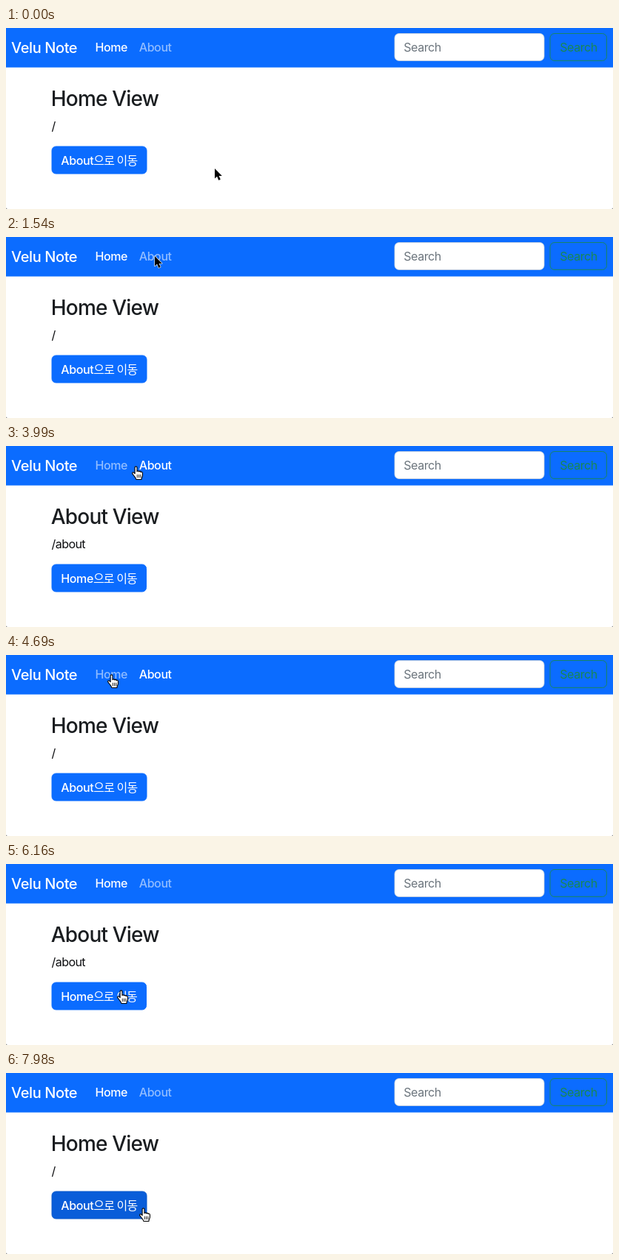
Write an HTML page that moves like this. It is 820 px wide and 246 px high and loops after 8 s.

```html
<!DOCTYPE html>
<html lang="ko">
<head>
<meta charset="utf-8">
<title>Router demo</title>
<style>
  html, body { margin: 0; width: 100%; height: 100%; overflow: hidden; background: #666; }
  svg { display: block; width: 820px; height: 246px; }
  text {
    font: 400 16px Inter, "Noto Sans CJK KR", "Noto Sans CJK", sans-serif;
    font-optical-sizing: none;
    letter-spacing: -.4px;
    fill: #212529;
  }
  .brand { font-size: 20px; font-weight: 450; letter-spacing: -.4px; fill: #fff; }
  .nav, .label { font-weight: 450; fill: #fff; }
  .title { font-size: 28px; font-weight: 530; letter-spacing: -.82px; fill: #1a1d20; }
  .path { letter-spacing: -.55px; fill: #0c0d0f; }
  .ko { font-weight: 500; letter-spacing: -.8px; }
</style>
</head>
<body>
<svg viewBox="0 0 820 246">
  <path d="M0 0H820V243.5a2.5 2.5 0 0 1-2.5 2.5H2.5a2.5 2.5 0 0 1-2.5-2.5Z" fill="#fff"/>
  <rect width="820" height="53.6" fill="#0b6cff"/>
  <text class="brand" x="7" y="33.5">Velu Note</text>
  <text class="nav" id="navHome" x="120.4" y="32">Home</text>
  <text class="nav" id="navAbout" x="179.7" y="32">About</text>
  <rect x="525" y="7.5" width="202" height="37" rx="6" fill="#fff" stroke="#ced4da" stroke-width=".8"/>
  <text x="537.2" y="32" style="fill:#6c757d">Search</text>
  <rect x="735" y="7.5" width="76.5" height="37" rx="6" fill="none" stroke="#198754" stroke-width=".9"/>
  <text x="748.2" y="32" style="fill:#198754">Search</text>

  <text class="title" id="title" x="60.8" y="105.5"></text>
  <text class="path" id="path" x="61.5" y="138.5"></text>
  <rect id="button" x="62" y="161" height="37" rx="5.5"/>
  <text class="label" x="74.3" y="185.5"><tspan id="target"></tspan><tspan class="ko">으로 이동</tspan></text>

  <path id="arrow" d="M0 0V13.6L3.1 10.8L5.3 15.9L7.8 14.8L5.6 9.9H9.8Z"
    fill="#000" stroke="#fff" stroke-width="1.2" stroke-linejoin="round" paint-order="stroke"/>
  <g id="hand" stroke="#000" stroke-linecap="round" stroke-linejoin="round">
    <path fill="#fff" d="M4 1.8C4 .4 6.6 .4 6.6 1.8V7C6.9 6 8.8 6 9 7.2C9.4 6.4 11.1 6.5 11.2 7.8
      C11.6 7.2 13.4 7.3 13.4 8.8V11.5C13.4 13.5 12 14.3 12 16.8H5.6C5.4 14.8 3.6 13.4 2.2 11.4
      C1.2 10 .2 9.2 .9 8.4C1.7 7.5 3.2 8.6 4 9.6Z"/>
    <path fill="none" stroke-width=".8" d="M6.9 11V14.3M9 11V14.3M11 11V14.3"/>
  </g>
</svg>
<script>
const LOOP = 8000, TICK = 70;
const START = [282, 191];

// Pointer moves: first tick, last tick, x, y
const moves = [
  [70, 140, 258, 169], [630, 910, 196, 120], [1120, 1120, 184, 58],
  [1400, 1400, 186, 50], [1540, 1540, 201, 26],
  [2380, 2730, 146, 28], [3290, 3500, 200, 28],
  [3850, 3990, 176, 29], [4060, 4270, 143, 28],
  [5110, 5390, 159, 133], [5460, 5880, 156, 173],
  [6650, 7070, 166, 182], [7980, 7980, 186, 185]
];
const clicks = [2380, 3290, 3850, 4690, 6160, 7560];
const HAND_FROM = 1750, BUTTON_ENTER = 5740, FADE = 150;

const pages = [
  { title: "Home View", path: "/", target: "About", width: 128 },
  { title: "About View", path: "/about", target: "Home", width: 127.5 }
];

const $ = id => document.getElementById(id);
const mix = (a, b, p) => a + (b - a) * p;
const ease = p => {
  p = Math.min(1, Math.max(0, p));
  return p * p * (3 - 2 * p);
};
const blend = (a, b, p) => `rgb(${a.map((v, i) => Math.round(mix(v, b[i], p)))})`;

function pointer(t) {
  let [x, y] = START;
  for (const [from, to, nx, ny] of moves) {
    if (t < from) break;
    const steps = (to - from) / TICK + 1;
    const p = Math.min(1, ((t - from) / TICK + 1) / steps);
    x = mix(x, nx, p);
    y = mix(y, ny, p);
  }
  return [x, y];
}

function draw(time) {
  const t = Math.floor(time / TICK) * TICK;
  const past = clicks.filter(c => c <= t);
  const last = past.length ? past[past.length - 1] : -LOOP;
  const index = past.length % 2;
  const page = pages[index];

  $("title").textContent = page.title;
  $("path").textContent = page.path;
  $("target").textContent = page.target;

  const fade = ease((t - last) / FADE);
  const about = index ? fade : 1 - fade;
  $("navAbout").style.fillOpacity = mix(.55, 1, about);
  $("navHome").style.fillOpacity = mix(1, .55, about);

  const hover = ease((t - Math.max(last, BUTTON_ENTER)) / FADE);
  const button = $("button");
  button.setAttribute("width", page.width);
  button.setAttribute("fill", blend([11, 108, 255], [9, 93, 217], hover));
  button.setAttribute("stroke", blend([11, 108, 255], [10, 88, 202], hover));

  const [x, y] = pointer(t);
  const overLink = t >= HAND_FROM && (y < 48 || y > 160);
  $("arrow").style.display = overLink ? "none" : "";
  $("hand").style.display = overLink ? "" : "none";
  $("arrow").setAttribute("transform", `translate(${x} ${y})`);
  $("hand").setAttribute("transform", `translate(${x - 6.3} ${y - 2}) scale(1.1)`);
}

const begin = performance.now();
function frame() {
  draw((performance.now() - begin) % LOOP);
  requestAnimationFrame(frame);
}
frame();
</script>
</body>
</html>
```
